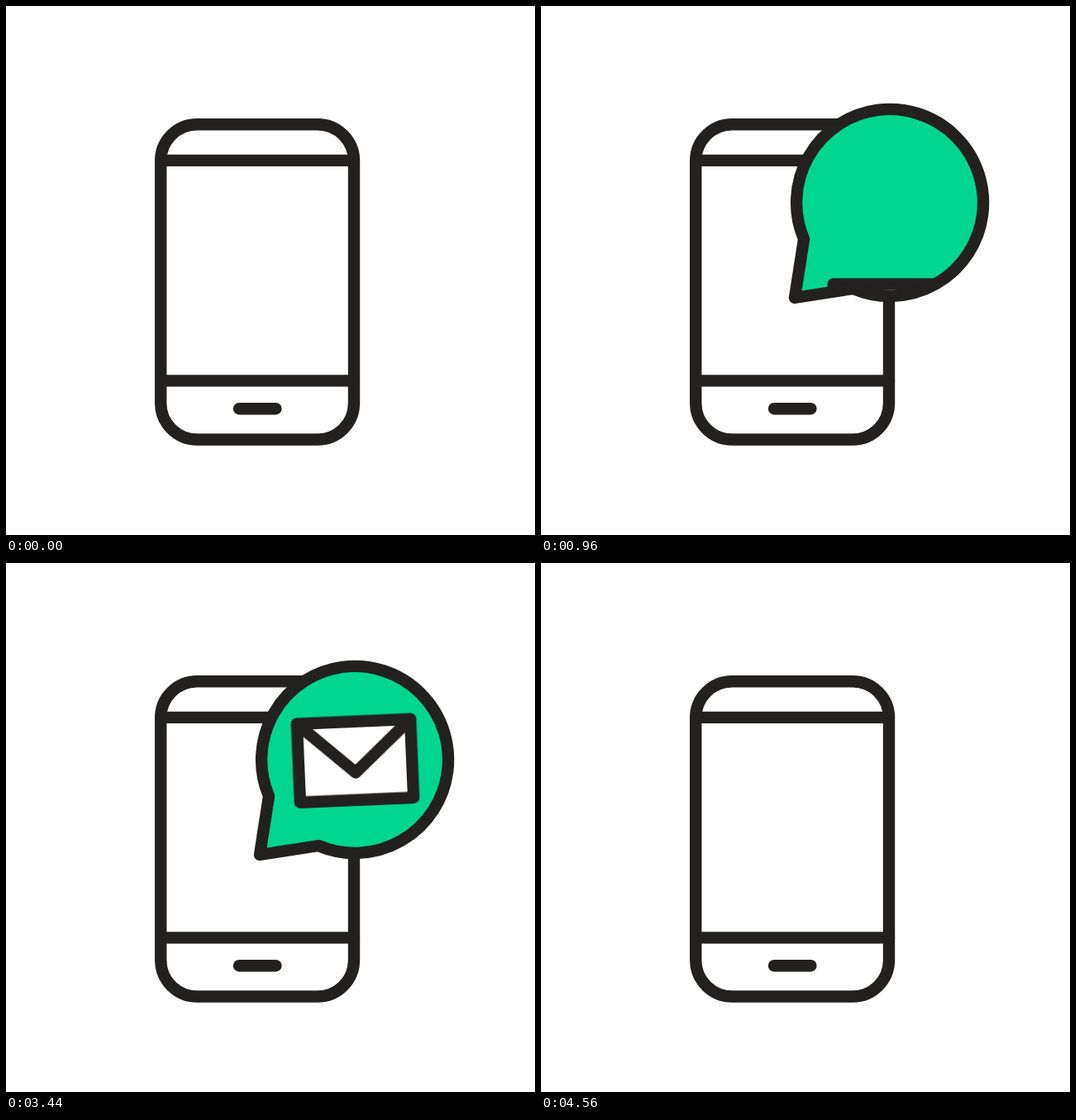
An HTML page for the animation above (6000 ms loop, 640 px wide and 640 px high).

```html
<!DOCTYPE html>
<html lang="en">
<head>
<meta charset="utf-8">
<title>Phone message</title>
<style>
  html, body { margin: 0; width: 100%; height: 100%; overflow: hidden; background: #fff; }
  svg { display: block; width: 100%; height: 100%; }

  .line { fill: none; stroke: #222120; stroke-width: 14.4; stroke-linecap: round; stroke-linejoin: round; }
  .paper { fill: #fff; }
  .green { fill: #00d68f; }

  .bubble, .slide, .wiggle {
    animation: 6s cubic-bezier(.3333, 0, .6667, 1) infinite both;
  }
  .bubble { transform-origin: 307px 353px; animation-name: swing; }
  .slide { animation-name: slide; }
  .wiggle { transform-origin: 422.5px 239.2px; animation-name: wiggle; }

  /* Grow from the tail tip, swing past upright, settle; later the reverse. */
  @keyframes swing {
    0% { transform: rotate(27.5deg) scale(0); }
    4.6667% { transform: rotate(27.5deg) scale(1); }
    9.3333% { transform: rotate(-7deg) scale(1); }
    14%, 64% { transform: rotate(0deg) scale(1); }
    68% { transform: rotate(-7deg) scale(1); }
    72% { transform: rotate(27.5deg) scale(1); }
    76%, 100% { transform: rotate(27.5deg) scale(0); }
  }
  @keyframes slide {
    0%, 14% { transform: translateY(172px); }
    22%, 100% { transform: translateY(0); }
  }
  @keyframes wiggle {
    0%, 21.3333%, 27.3333%, 39.3333%, 45.3333%, 56.6667%, 62.6667%, 100% { transform: rotate(0deg); }
    23.3333%, 41.3333%, 58.6667% { transform: rotate(-9deg); }
    25.3333%, 43.3333%, 60.6667% { transform: rotate(9deg); }
  }
</style>
</head>
<body>
<svg viewBox="0 0 640 640">
  <defs>
    <path id="balloon" d="M318 282A113 113 0 1 1 378 342L307 353Z"/>
    <clipPath id="inside"><use href="#balloon"/></clipPath>
  </defs>

  <g class="line">
    <rect x="187.2" y="143.2" width="233.8" height="381.3" rx="44"/>
    <path d="M187.2 186.9H421M187.2 453.4H421M282 487.2H326.4"/>
  </g>

  <g class="bubble">
    <use href="#balloon" class="green"/>
    <g clip-path="url(#inside)">
      <g class="slide">
        <g class="wiggle line">
          <rect class="paper" x="353.8" y="191.7" width="137.4" height="95"/>
          <path d="M353.8 191.7L422.5 253.5L491.2 191.7"/>
        </g>
      </g>
    </g>
    <use href="#balloon" class="line"/>
  </g>
</svg>
</body>
</html>
```
